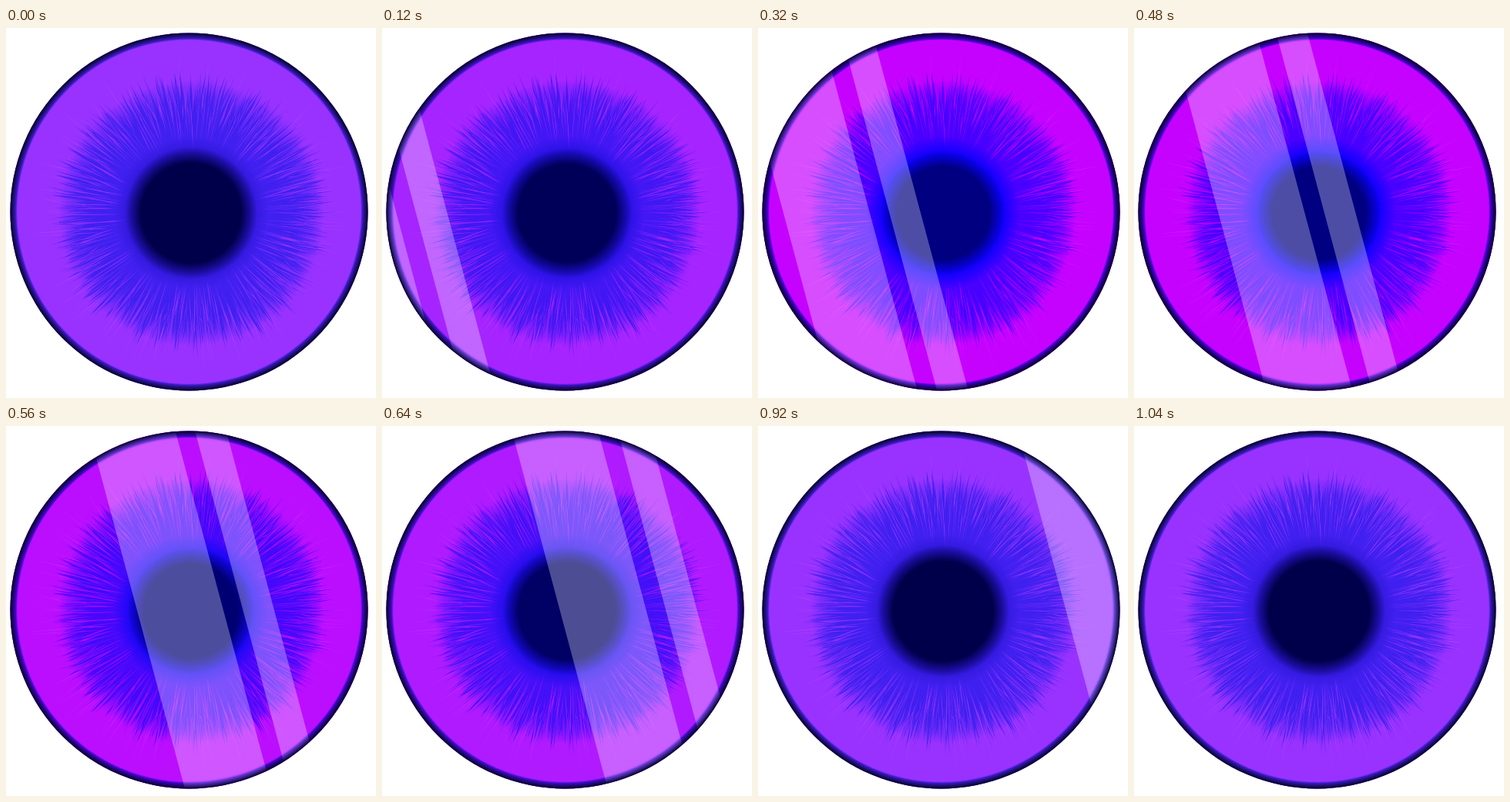
An HTML page with a canvas for the animation above (1080 ms loop, 480 by 480 pixels).

```html
<!DOCTYPE html>
<html>
<head>
<meta charset="utf-8">
<title>Iris</title>
<style>
html, body { margin: 0; width: 100%; height: 100%; overflow: hidden; background: #fff; }
canvas { display: block; width: 480px; height: 480px; }
</style>
</head>
<body>
<canvas id="eye" width="480" height="480"></canvas>
<script>
const ctx = document.getElementById('eye').getContext('2d');
const LOOP = 1080, STEP = 40, TAU = Math.PI * 2;
const CX = 237.5, CY = 238.5, R = 232, PUPIL = 240;
const SLOPE = Math.tan(Math.PI / 12);

// Colours at rest and at full glow
const CALM = { iris: [153, 50, 255], fibre: [64, 32, 240], halo: [46, 22, 215], pupil: [0, 0, 74] };
const VIVID = { iris: [198, 2, 255], fibre: [72, 0, 255], halo: [12, 0, 255], pupil: [0, 0, 128] };

// Time and x of the glare at mid height
const GLARE = [[0, -190], [200, -29], [320, 33], [480, 109.5], [640, 231], [800, 317.5], [1040, 482]];

const mix = (a, b, k) => a + (b - a) * k;
const ramp = (t, from, to) => Math.min(1, Math.max(0, (t - from) / (to - from)));
const rgba = (c, a = 1) => `rgba(${c.map(Math.round).join()},${a})`;

let seed = 17;
function rand(lo, hi) {
  seed = (seed * 16807) % 2147483647;
  return mix(lo, hi, seed / 2147483647);
}

function polar(angle, r) {
  return [PUPIL + r * Math.cos(angle), PUPIL + r * Math.sin(angle)];
}

// Thin lens shapes running outwards around the pupil
function fibres(count, inner, outer, width, tilt) {
  const path = new Path2D();
  for (let i = 0; i < count; i++) {
    const angle = (i + rand(0, 1)) / count * TAU;
    const r1 = rand(...inner), r2 = rand(...outer), turn = rand(-tilt, tilt);
    const mid = (r1 + r2) / 2, spread = rand(...width) / mid;
    const start = polar(angle, r1), end = polar(angle + turn, r2);
    path.moveTo(...start);
    path.quadraticCurveTo(...polar(angle + turn / 2 + spread, mid), ...end);
    path.quadraticCurveTo(...polar(angle + turn / 2 - spread, mid), ...start);
  }
  return path;
}

const blueFibres = fibres(420, [90, 125], [160, 186], [1, 2.4], 0.05);
const gaps = fibres(330, [80, 135], [140, 200], [0.4, 1.5], 0.05);
const fineBlue = fibres(220, [95, 140], [150, 192], [0.4, 1.2], 0.05);
const paleFibres = fibres(150, [80, 160], [165, 216], [0.4, 0.9], 0.04);

function glareAt(t) {
  const i = GLARE.findIndex(key => key[0] >= t) || 1;
  const [[t1, x1], [t2, x2]] = GLARE.slice(i - 1, i + 1);
  return mix(x1, x2, ramp(t, t1, t2));
}

function radial(x, y, r1, r2, ...colors) {
  const g = ctx.createRadialGradient(x, y, r1, x, y, r2);
  colors.forEach((color, i) => g.addColorStop(i / (colors.length - 1), color));
  return g;
}

function disc(x, y, r, fill) {
  ctx.fillStyle = fill;
  ctx.beginPath();
  ctx.arc(x, y, r, 0, TAU);
  ctx.fill();
}

function softDisc(r1, r2, color) {
  disc(PUPIL, PUPIL, r2, radial(PUPIL, PUPIL, r1, r2, rgba(color), rgba(color, 0)));
}

function fillPath(path, fill) {
  ctx.fillStyle = fill;
  ctx.fill(path);
}

function band(x, width) {
  const shift = 240 * SLOPE;
  ctx.beginPath();
  ctx.moveTo(x - shift, 0);
  ctx.lineTo(x + width - shift, 0);
  ctx.lineTo(x + width + shift, 480);
  ctx.lineTo(x + shift, 480);
  ctx.fill();
}

function draw(t) {
  const glow = ramp(t, 40, 320) - ramp(t, 480, 800);
  const tone = name => CALM[name].map((v, i) => mix(v, VIVID[name][i], glow));
  const iris = tone('iris'), fibre = tone('fibre'), pupil = tone('pupil');
  const core = mix(65, 60, glow);

  ctx.clearRect(0, 0, 480, 480);
  disc(CX, CY, R, rgba(iris));

  softDisc(135, 172, fibre);
  fillPath(blueFibres, rgba(fibre, 0.85));
  fillPath(gaps, rgba(iris, 0.85));
  fillPath(fineBlue, rgba(fibre, 0.85));
  fillPath(paleFibres, 'rgba(255,130,255,0.22)');

  softDisc(76, 100, tone('halo'));
  softDisc(core, core + 21, pupil);

  // Rim: a blue ring darkening towards its edge
  disc(CX, CY, R, radial(CX, CY, 222.5, 225, rgba(fibre, 0), rgba(fibre, 0.9)));
  disc(CX, CY, R, radial(CX, CY, 223, R, 'rgba(0,0,20,0)', 'rgba(0,0,20,0.5)', 'rgba(0,0,20,0.95)'));

  ctx.fillStyle = radial(CX, CY, 221, R, 'rgba(255,255,255,0.3)', 'rgba(255,255,255,0)');
  const x = glareAt(t);
  band(x, 112);
  band(x + 137.5, 40.5);
}

const start = performance.now();
function tick() {
  const t = (performance.now() - start) % LOOP;
  draw(Math.floor(t / STEP) * STEP);
  requestAnimationFrame(tick);
}
tick();
</script>
</body>
</html>
```
